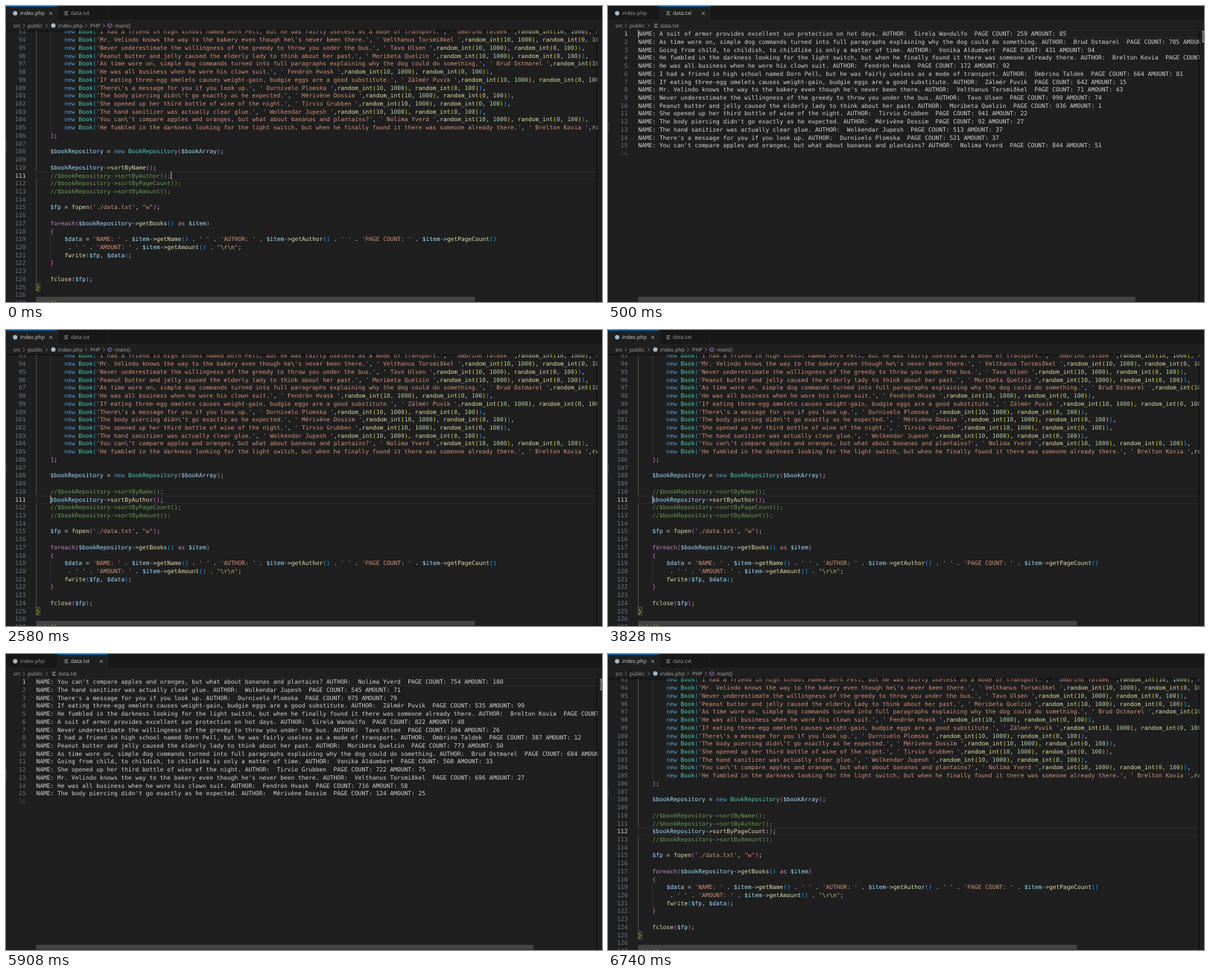
An HTML page for the animation above (8 s loop, 800 by 398 pixels).

```html
<!DOCTYPE html>
<html lang="en">
<head>
<meta charset="utf-8">
<title>Sorting books</title>
<style>
  html, body { margin: 0; width: 100%; height: 100%; overflow: hidden; background: #1f1f1f; }
  #stage { position: relative; width: 800px; height: 398px; overflow: hidden; }
  #strip { animation: cut 8s step-end infinite; }
  #strip > svg { display: block; width: 800px; height: 398px; }
  @keyframes cut {
    0% { transform: translateY(0); }
    6.25% { transform: translateY(-398px); }
    32.25% { transform: translateY(-796px); }
    58.25% { transform: translateY(-1194px); }
    84.25% { transform: translateY(-1592px); }
    100% { transform: translateY(-1592px); }
  }
  /* the invisible skew keeps baselines from snapping to whole pixels */
  text { white-space: pre; text-rendering: geometricPrecision; fill: #d4d4d4; transform: skewY(.002deg); }
  .mono { font: 7.9px "DejaVu Sans Mono", monospace; }
  .ui { font: 7.1px "Open Sans", "Noto Sans", sans-serif; }
  .num { fill: #6e7681; text-anchor: end; }
  .dim { fill: #9d9d9d; }
  .comment { fill: #6a9955; }
  .str { fill: #ce9178; }
  .esc { fill: #d7ba7d; }
  .var { fill: #9cdcfe; }
  .key { fill: #569cd6; }
  .ctrl { fill: #c586c0; }
  .type { fill: #4ec9b0; }
  .fn { fill: #dcdcaa; }
  .int { fill: #b5cea8; }
  .b0 { fill: #ffd700; }
  .b1 { fill: #da70d6; }
  .b2 { fill: #179fff; }
</style>
</head>
<body>
<div id="stage"><div id="strip"></div></div>
<script>
const LINE = 10.7255, CHAR = 4.757, LEFT = 40.5, TOP = 32.2, EDGE = 794.3;

const books = [
  ["I had a friend in high school named Dorn Pell, but he was fairly useless as a mode of transport.", "Ombrino Taldek"],
  ["Mr. Velindo knows the way to the bakery even though he's never been there.", "Velthanus Torsmiðkel"],
  ["Never underestimate the willingness of the greedy to throw you under the bus.", "Tavo Ulsen"],
  ["Peanut butter and jelly caused the elderly lady to think about her past.", "Moribeta Quelzin"],
  ["As time wore on, simple dog commands turned into full paragraphs explaining why the dog could do something.", "Brud Ostmarel"],
  ["He was all business when he wore his clown suit.", "Fendrón Hvask"],
  ["If eating three-egg omelets causes weight-gain, budgie eggs are a good substitute.", "Zálmér Puvik"],
  ["There's a message for you if you look up.", "Durnivelo Plomska"],
  ["The body piercing didn't go exactly as he expected.", "Mérivène Dossim"],
  ["She opened up her third bottle of wine of the night.", "Tirvio Grubben"],
  ["The hand sanitizer was actually clear glue.", "Wolkendar Jupesh"],
  ["You can't compare apples and oranges, but what about bananas and plantains?", "Nolima Yverd"],
  ["He fumbled in the darkness looking for the light switch, but when he finally found it there was someone already there.", "Brelton Kovia"],
  ["A suit of armor provides excellent sun protection on hot days.", "Sirela Wandulfo"],
  ["Going from child, to childish, to childlike is only a matter of time.", "Vonika Aldumbert"]
];

// book index, page count, amount
const byName = [[13, 259, 85], [4, 785, 12], [14, 431, 94], [12, 300, 40], [5, 172, 92],
  [0, 664, 81], [6, 642, 15], [1, 71, 43], [2, 990, 74], [3, 936, 1], [9, 941, 22],
  [8, 92, 27], [10, 513, 37], [7, 521, 37], [11, 844, 51]];
const byAuthor = [[11, 754, 100], [10, 545, 71], [7, 975, 79], [6, 535, 99], [12, 300, 40],
  [13, 822, 48], [2, 394, 26], [0, 387, 12], [3, 773, 50], [4, 684, 12], [14, 508, 33],
  [9, 722, 75], [1, 696, 27], [5, 716, 58], [8, 124, 25]];

const esc = s => s.replace(/&/g, "&amp;").replace(/</g, "&lt;").replace(/>/g, "&gt;");
const rect = (x, y, w, h, fill, more = "") =>
  `<rect x="${x}" y="${y}" width="${w}" height="${h}" fill="${fill}" ${more}/>`;
const text = (x, y, cls, body, more = "") => `<text x="${x}" y="${y}" class="${cls}" ${more}>${body}</text>`;
const path = (d, stroke, w = 0.7) => `<path d="${d}" fill="none" stroke="${stroke}" stroke-width="${w}"/>`;
const span = (cls, s) => `<tspan class="${cls}">${esc(s)}</tspan>`;

const chevron = (x, y) => path(`M${x - 1.3} ${y - 2.4}l2.5 2.4l-2.5 2.4`, "#a9a9a9", 0.6);
const cross = (x, y) => path(`M${x - 2} ${y - 2}l4 4m0 -4l-4 4`, "#ccc");
const fileIcon = (x, y) => path(`M${x} ${y - 2}h5m-5 2h3.6m-3.6 2h5`, "#b5bcc2", 0.8);
const dot = (x, y) => `<circle cx="${x}" cy="${y}" r="3" fill="#a3b8c8"/>`;
const cube = (x, y) => path(`M${x} ${y - 3}l2.8 1.5v3l-2.8 1.5l-2.8 -1.5v-3zm-2.8 1.5l2.8 1.5l2.8 -1.5m-2.8 1.5v3`, "#b180d7", 0.6);

// Syntax colouring; depth carries the bracket level from line to line.
const TOKEN = /(\/\/.*)|('(?:\\.|[^'])*'|"[^"]*")|(\$\w+)|\b(new)\b|\b(foreach|as)\b|\b(Book(?:Repository)?)\b|(\w+)(?=\()|\b(\d+)\b|([()[\]{}])|[^]/g;
const KINDS = ["comment", "str", "var", "key", "ctrl", "type", "fn", "int"];

function paint(src, state) {
  let out = "";
  for (const m of src.matchAll(TOKEN)) {
    const kind = KINDS[m.slice(1, 9).findIndex(g => g !== undefined)];
    if (kind === "str") {
      out += m[0].split(/(\\.)/).map(p => p && span(p[0] === "\\" ? "esc" : "str", p)).join("");
    } else if (kind) {
      out += span(kind, m[0]);
    } else if (m[9]) {
      const level = "([{".includes(m[9]) ? state.depth++ : --state.depth;
      out += span("b" + level % 3, m[9]);
    } else out += esc(m[0]);
  }
  return out;
}

function codeLines(active) {
  const quote = s => `'${s.replace(/'/g, "\\'")}'`;
  const sorts = ["Name", "Author", "PageCount", "Amount"].map((s, i) =>
    `    ${i === active ? "" : "//"}$bookRepository->sortBy${s}();`);
  return [
    ...books.slice(0, 13).map(([title, author]) =>
      `        new Book(${quote(title)}, ' ${author} ',random_int(10, 1000), random_int(0, 100)),`),
    "    ];", "",
    "    $bookRepository = new BookRepository($bookArray);", "",
    ...sorts, "",
    "    $fp = fopen('./data.txt', \"w\");", "",
    "    foreach($bookRepository->getBooks() as $item)",
    "    {",
    "        $data = 'NAME: ' . $item->getName() . ' ' . 'AUTHOR: ' . $item->getAuthor() . ' ' . 'PAGE COUNT: ' . $item->getPageCount()",
    "         . ' ' . 'AMOUNT: ' . $item->getAmount() . \"\\r\\n\";",
    "        fwrite($fp, $data);",
    "    }", "",
    "    fclose($fp);",
    "}", "",
    "main();"
  ];
}

function header(codeOpen) {
  const [x, w] = codeOpen ? [0, 69] : [69, 68];
  const crumb = (x, s) => text(x, 29, "ui", s, 'style="fill:#a9a9a9"');
  const tail = codeOpen
    ? dot(63.5, 26.3) + crumb(70, "index.php") + chevron(107.5, 26.5) + crumb(113, "PHP") +
      chevron(131.5, 26.5) + cube(139.3, 26.4) + crumb(146, "main()")
    : fileIcon(62, 26.5) + crumb(70, "data.txt");
  return rect(0, 0, 800, 19.8, "#181818") + rect(0, 19.2, 800, 0.6, "#2b2b2b") +
    rect(x, 0, w, 19.8, "#1f1f1f") + rect(x, 0, w, 0.8, "#0078d4") +
    rect(68.6, 0, 0.6, 19.8, "#2b2b2b") + rect(136.6, 0, 0.6, 19.8, "#2b2b2b") +
    dot(12.3, 9.7) + text(19, 12.2, codeOpen ? "ui" : "ui dim", "index.php") +
    fileIcon(78.5, 9.8) + text(87, 12.2, codeOpen ? "ui dim" : "ui", "data.txt") +
    cross(codeOpen ? 60 : 128, 9.9) +
    crumb(10, "src") + chevron(24, 26.5) + crumb(29, "public") + chevron(54.5, 26.5) + tail;
}

// rows: painted lines; y0: top of the first row; first: its line number
function scene({ codeOpen, rows, y0, first, current, caret, under = "", bar, mark }) {
  const rowY = n => y0 + (n - first) * LINE;
  let s = under;
  const y = rowY(current);
  s += rect(LEFT, y + 0.5, 780, LINE - 1, "none", 'stroke="#2a2a2a" stroke-width="1.1"');
  rows.forEach((row, i) => {
    const n = first + i, base = rowY(n) + 8;
    const shade = n === current ? "fill:#d4d4d4" : !codeOpen && n === 16 ? "fill:#444" : "";
    s += text(26.4, base, "mono num", n, `style="${shade}"`) + text(LEFT, base, "mono", row);
  });
  if (caret >= 0) s += rect(LEFT + caret * CHAR - 0.1, y, 1.1, LINE, "#aeafad");
  s += rect(LEFT, 391, bar - LEFT, 6.4, "#797979", 'fill-opacity=".4"');
  if (codeOpen) s += rect(0, TOP, 800, 3, "url(#down)");
  s += rect(EDGE - 3, TOP, 3, 366, "url(#side)");

  let map = "";
  if (!codeOpen) for (let i = 0; i < 15; i++) map += rect(797.6, 33 + i * 1.08, 2.4, 0.8, "#999");
  return `<svg viewBox="0 0 800 398">` + rect(0, 0, 800, 398, "#1f1f1f") +
    `<svg x="0" y="${TOP}" width="${EDGE}" height="365.8" viewBox="0 ${TOP} ${EDGE} 365.8">${s}</svg>` +
    rect(0, mark, 0.7, 12, "#4a4a4a") + map + header(codeOpen) + `</svg>`;
}

function codeScene(active, current, caret) {
  const y0 = 29.45, state = { depth: 2 };
  const rows = codeLines(active).map(l => paint(l, state));
  const guide = (col, from, to, fill) =>
    rect(LEFT + col * CHAR, y0 + (from - 93) * LINE, 0.6, (to - from + 1) * LINE, fill);
  const under = guide(0, 93, 124, "#707070") + guide(4, 93, 105, "#404040") + guide(4, 119, 121, "#404040") +
    rect(LEFT + 0.2, y0 + 32 * LINE + 0.3, CHAR, LINE - 0.6, "#1c261c", 'stroke="#888" stroke-width=".55"');
  return scene({ codeOpen: true, rows, y0, first: 93, current, caret, under, bar: 629.5, mark: 181 });
}

function dataScene(order, caret) {
  const rows = order.map(([i, pages, amount]) =>
    esc(`NAME: ${books[i][0]} AUTHOR:  ${books[i][1]}  PAGE COUNT: ${pages} AMOUNT: ${amount}`));
  return scene({ codeOpen: false, rows: [...rows, ""], y0: TOP, first: 1, current: 1, caret, bar: 708, mark: 157 });
}

const fade = (id, dir, a, b) => `<linearGradient id="${id}" ${dir}>` +
  `<stop offset="0" stop-color="#000" stop-opacity="${a}"/><stop offset="1" stop-color="#000" stop-opacity="${b}"/></linearGradient>`;

document.getElementById("strip").innerHTML = [
  codeScene(0, 111, 38),
  dataScene(byName, 0),
  codeScene(1, 111, 4),
  dataScene(byAuthor, -1),
  codeScene(2, 112, -1)
].join("") + `<svg><defs>${fade("down", 'x2="0" y2="1"', 0.6, 0)}${fade("side", "", 0, 0.6)}</defs></svg>`;
</script>
</body>
</html>
```
